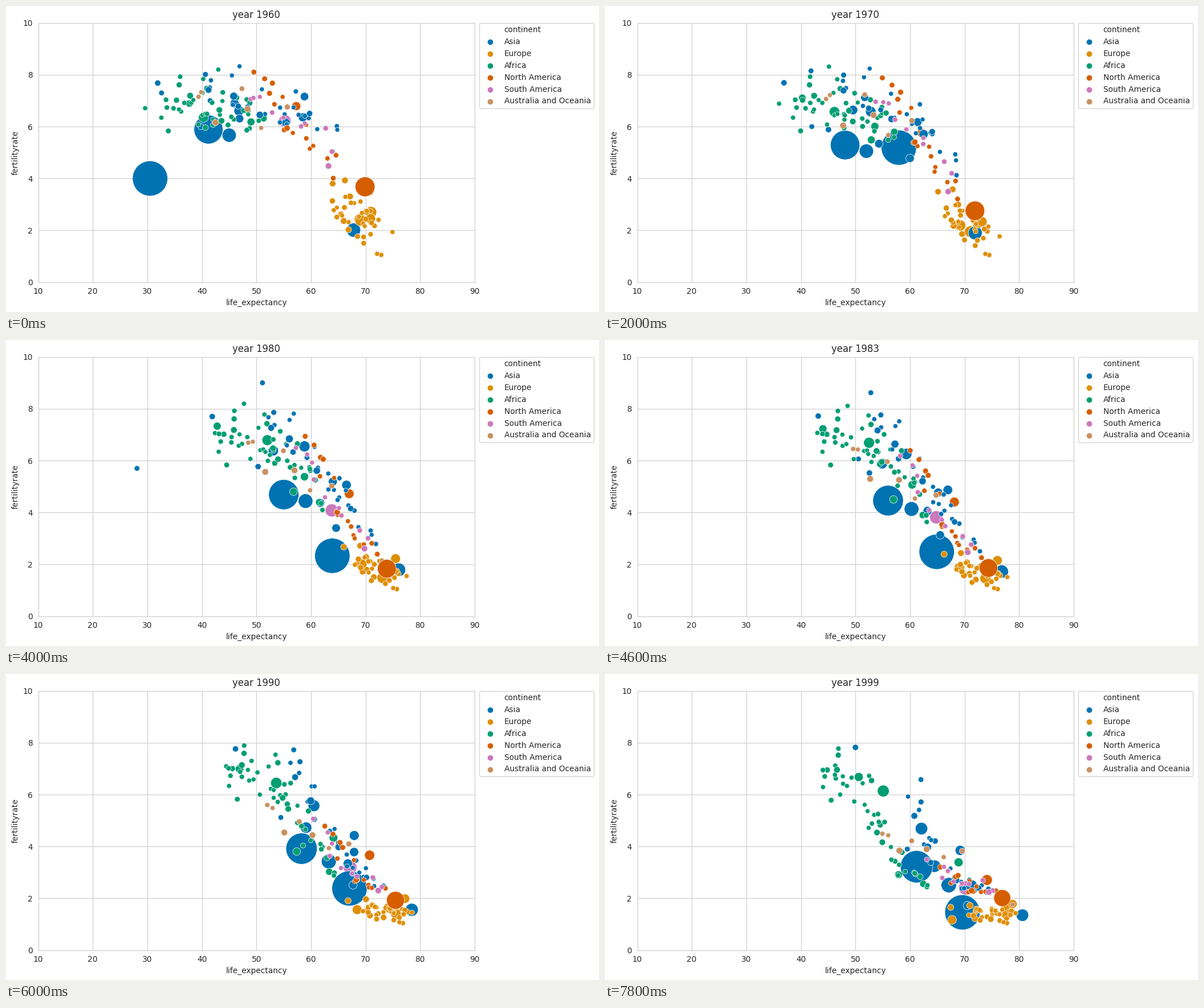
Recreate the animation shown at these times as a matplotlib script. Size 1040 by 538 pixels, loop 8 s.

```python
import matplotlib.pyplot as plt
import numpy as np
from matplotlib.animation import FuncAnimation

W, H, DPI = 1040, 538, 100
FIRST, LAST = 1960, 1999
LEFT, RIGHT, TOP, BOTTOM = 56.5, 822, 29.7, 485.6
INK, RULE = "#262626", "#cccccc"

COLORS = {"Asia": "#0173b2", "Europe": "#de8f05", "Africa": "#029e73",
          "North America": "#d55e00", "South America": "#cc78bc",
          "Australia and Oceania": "#ca9161"}
ASIA, EUROPE, AFRICA, NORTH, SOUTH, OCEANIA = COLORS

rng = np.random.default_rng(12)
bubbles = []    # (color, diameter at start and end, path function of year)


def track(group, size, *points, years=(FIRST, 1980, LAST)):
    """A bubble led through a few (life, fertility) points."""
    life, births = zip(*points)

    def path(year):
        return np.interp(year, years, life), np.interp(year, years, births)

    ends = size if isinstance(size, tuple) else (size, size)
    bubbles.append((COLORS[group], ends, path))


def steady(t):
    return t ** 0.8


def stalled(t):
    return np.sin(np.pi / 2 * t / 0.8)


def country(group, size, rank, life, gain, births, turn, shape):
    """Life expectancy climbs while fertility drops along a logistic curve."""
    def path(year):
        t = (year - FIRST) / (LAST - FIRST)
        drop = 1 / (1 + np.exp((turn - year) / 6))
        high, low = births
        return life + gain * shape(t), high + (low - high) * drop

    bubbles.append((COLORS[group], (size, size), path))


def crowd(group, count, life, rise, births, slope, noise, turn, lead, shape=steady):
    """Scatter a continent's smaller countries by their rank of development.

    life and rise are (mean, spread) of life expectancy at the two ends;
    turn is the mean year of the fertility drop, lead its shift with rank.
    """
    ranks = np.linspace(-1.7, 1.7, count) + rng.normal(0, 0.15, count)
    for rank in ranks:
        shift = rng.normal(0, noise)
        start = life[0] + life[1] * rank + rng.normal(0, 1)
        end = rise[0] + rise[1] * rank + rng.normal(0, 1)
        high = births[0] - slope * rank + shift
        low = births[1] + 0.3 * shift
        size = min(7.6 + rng.exponential(1.1), 13)
        country(group, size, rank, start, end - start, (high, low),
                turn - lead * rank, shape)


# Populous countries and sharp breaks, back to front
track(ASIA, (15, 21), (46, 6.9), (53.1, 6.38), (64.5, 3.24))
track(SOUTH, (21, 24), (55.2, 6.22), (63.8, 4.08), (70.2, 2.4))
track(ASIA, 61, (30.5, 4), (51, 7.2), (55.3, 6.22), (60.6, 4.16),
      (63.9, 2.33), (66.2, 2.69), (69.6, 1.46),
      years=(FIRST, 1963, 1966, 1974, 1980, 1987, LAST))
track(AFRICA, (13, 15), (48.3, 6.64), (58.8, 5.38), (68.9, 3.39))
track(AFRICA, (12, 15), (37.7, 6.89), (42.8, 7.33), (50.6, 6.68))
track(EUROPE, (20, 17), (69, 2.42), (73.1, 1.48), (77.7, 1.37))
track(ASIA, (50, 56), (41.2, 5.89), (55, 4.69), (61.2, 3.22))
track(ASIA, (24, 26), (45, 5.67), (59, 4.44), (67.1, 2.51))
track(ASIA, (24, 21), (67.8, 2.01), (76.1, 1.79), (80.6, 1.35))
track(NORTH, (15, 18), (57.3, 6.79), (67, 4.72), (74.1, 2.71))
track(ASIA, 10, (39.8, 6), (50.3, 5.77), (64.6, 4.21))
track(AFRICA, (17, 20), (40.3, 6.36), (52, 6.79), (55.1, 6.14))
track(ASIA, (17, 21), (46.8, 6.61), (58.8, 6.55), (62.1, 4.69))
track(ASIA, (15, 17), (58.5, 6.36), (66.5, 5.06), (69.2, 3.85))
track(AFRICA, 13, (49, 6.18), (56.8, 4.8), (57.9, 2.91))
track(ASIA, 14, (55.4, 6.16), (64.6, 3.4), (70.5, 1.72))
track(ASIA, (14, 16), (46.9, 6.31), (61.7, 4.37), (71.3, 2.42))
track(EUROPE, (19, 15), (69.1, 2.38), (69.3, 2), (67.7, 1.17))
track(EUROPE, (19, 16), (71, 2.7), (73.9, 1.88), (77.6, 1.7))
track(EUROPE, (17, 15), (70.9, 2.45), (75.5, 2.22), (78.8, 1.78))
track(ASIA, (14, 16), (58.8, 7.16), (64, 5.19), (71.4, 2.52))
track(ASIA, 10, (31.9, 7.68), (41.9, 7.7), (50, 7.82))
track(ASIA, 9, (32.6, 7.3), (51.1, 9), (62, 6.58))
track(ASIA, 9, (41.5, 7), (42, 6), (34.9, 5.81), (18.2, 5.7), (19.6, 5.68),
      (28.1, 5.7), (50, 6.2), (59.5, 3.9),
      years=(FIRST, 1970, 1974, 1977, 1979, 1980, 1982, LAST))
track(AFRICA, 8, (43, 8.2), (46, 8.36), (49.7, 8), (48.5, 6.6), (13.2, 6.43),
      (45.4, 6.35), (47.2, 6),
      years=(FIRST, 1974, 1987, 1993, 1994, 1995, LAST))
track(AFRICA, 8, (29.6, 6.71), (42.4, 7.06), (46.3, 7.12))

# Everyone else
crowd(AFRICA, 43, life=(41.5, 5), rise=(54, 5.5), births=(6.8, 2.5),
      slope=0, noise=0.5, turn=2004, lead=14, shape=stalled)
crowd(EUROPE, 35, life=(68.5, 2.7), rise=(74.5, 3), births=(2.65, 1.4),
      slope=0.4, noise=0.4, turn=1976, lead=2)
crowd(ASIA, 27, life=(52.5, 7), rise=(68.5, 4.5), births=(6.9, 2.2),
      slope=0.4, noise=0.5, turn=1987, lead=9)
crowd(NORTH, 16, life=(57, 4.5), rise=(71.5, 3.5), births=(6.2, 2.2),
      slope=0.8, noise=0.4, turn=1979, lead=6)
crowd(SOUTH, 10, life=(56, 5.5), rise=(69.5, 3), births=(6.2, 2.4),
      slope=0.4, noise=0.5, turn=1980, lead=7)
crowd(OCEANIA, 7, life=(46.5, 5), rise=(61.5, 4.5), births=(6.8, 3.7),
      slope=0, noise=0.4, turn=1985, lead=4)
track(OCEANIA, 8, (71, 3.45), (73, 2.15), (78.8, 1.76))
track(NORTH, (34, 29), (69.9, 3.68), (73.9, 1.83), (76.9, 2.01))


def state(year):
    t = (year - FIRST) / (LAST - FIRST)
    spots = [path(year) for _, _, path in bubbles]
    widths = np.array([a + (b - a) * t ** 1.5 + 0.6 for _, (a, b), _ in bubbles])
    return np.array(spots), (widths * 72 / DPI) ** 2


plt.rcParams.update({"font.family": "DejaVu Sans", "font.size": 9.9,
                     "text.color": INK, "axes.labelcolor": INK,
                     "axes.edgecolor": RULE, "axes.axisbelow": True})
fig = plt.figure(figsize=(W / DPI, H / DPI), dpi=DPI, facecolor="white")
ax = fig.add_axes([LEFT / W, 1 - BOTTOM / H, (RIGHT - LEFT) / W, (BOTTOM - TOP) / H])
ax.set(xlim=(10, 90), ylim=(0, 10), xlabel="life_expectancy", ylabel="fertilityrate")
ax.set_yticks(range(0, 11, 2))
ax.grid(color=RULE, linewidth=0.8)
ax.tick_params(bottom=False, left=False, labelcolor=INK)
title = ax.set_title("")

ax.scatter([], [], s=0, color="none", label="continent")
for name, color in COLORS.items():
    ax.scatter([], [], s=36, color=color, label=name)
ax.legend(loc="upper left", bbox_to_anchor=(1.01, 1), borderaxespad=0)

spots, areas = state(FIRST)
cloud = ax.scatter(*spots.T, s=areas, c=[color for color, _, _ in bubbles],
                   linewidths=0.5, edgecolors="white", zorder=3)


def draw(frame):
    year = FIRST + frame
    spots, areas = state(year)
    cloud.set_offsets(spots)
    cloud.set_sizes(areas)
    title.set_text(f"year {year}")
    return cloud, title


anim = FuncAnimation(fig, draw, frames=LAST - FIRST + 1, interval=200,
                     repeat=True, repeat_delay=0)
plt.show()
```
